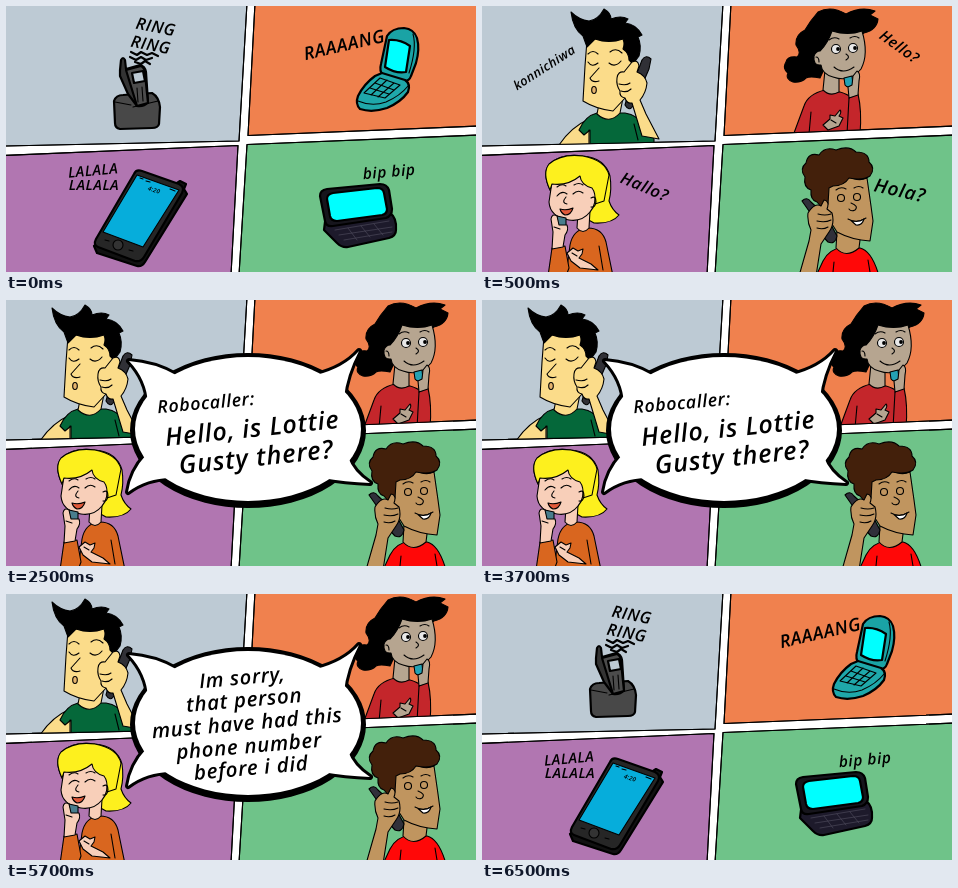
Write an HTML page that moves like this. It is 470 px wide and 266 px high and loops after 8 s.

```html
<!DOCTYPE html>
<html lang="en">
<head>
<meta charset="utf-8">
<title>Four phone calls</title>
<style>
  html, body { margin: 0; width: 100%; height: 100%; overflow: hidden; background: #fff; }
  svg { display: block; width: 100vw; height: 100vh; }
  path, ellipse, circle { stroke: #000; stroke-width: 1.1; stroke-linejoin: round; stroke-linecap: round; }
  .line path, .line circle { fill: none; }
  .dot circle { fill: #000; stroke: none; }
  .thick path { stroke-width: 2.2; }
  text { font: italic 600 20px "Open Sans", "Noto Sans", sans-serif; letter-spacing: .035em; text-anchor: middle; dominant-baseline: central; }
  #tails { stroke: inherit; stroke-width: inherit; }
  .rim > * { fill: #000; stroke: #000; stroke-width: 6; }
  .inside > * { fill: #fff; stroke: none; }
</style>
</head>
<body>
<svg viewBox="0 0 470 266" preserveAspectRatio="none">
  <defs>
    <path id="p1" d="M-3-3H241L233 135-3 140Z"/>
    <path id="p2" d="M249-3H473V120L242 129.500Z"/>
    <path id="p3" d="M-3 149.500 232 139.500 225 269H-3Z"/>
    <path id="p4" d="M241 138.500 473 129V269H233Z"/>
    <path id="tails" d="M123 61Q149 63 170 75L142 104Q141 80 123 61ZM353 51Q338 68 310 75L338 98Q340 76 353 51ZM122 192Q125 171 140 155L165 178Q141 178 122 192ZM364 183Q339 182 316 178L342 157Q347 172 364 183Z"/>
    <clipPath id="c1"><use href="#p1"/></clipPath>
    <clipPath id="c2"><use href="#p2"/></clipPath>
    <clipPath id="c3"><use href="#p3"/></clipPath>
    <clipPath id="c4"><use href="#p4"/></clipPath>
  </defs>
  <use href="#p1" fill="#bdcad4"/>
  <use href="#p2" fill="#f0814e"/>
  <use href="#p3" fill="#b176b1"/>
  <use href="#p4" fill="#6fc389"/>

  <g id="phones">
    <!-- cordless phone -->
    <g class="thick">
      <path fill="#484848" d="M108 95Q110 89 117 89L146 87Q153 91 154 101L153 118Q152 122 146 122L114 123Q109 122 109 117Z"/>
      <path fill="#333" d="M114 64 115 54Q117 50 119 54L120 63 134 59Q139 60 140 66L142 96Q138 101 131 100L122 88 114 70Z"/>
      <path fill="#4c4c4c" d="M120 64 135 60Q139 62 139 68L142 97 131 100Z"/>
      <path fill="#bdcad4" d="M126 67 137 65 139 75 128 77Z"/>
    </g>
    <g class="line">
      <path d="M131 82 132 96M136 81 137 95M109 96 125 99M127 101 152 95"/>
      <g class="thick"><path d="M125 46 131 49 135 46 141 49 146 47 152 50M124 51 130 54 135 51 140 54 146 52M129 56 135 58 139 55 144 58"/></g>
    </g>
    <!-- flip phone -->
    <g class="thick">
      <path fill="#1aa3a5" d="M381 30Q386 22 398 22 408 23 411 32 414 43 410 57L405 70Q403 76 396 75L377 69Q373 65 375 58Z"/>
      <path fill="#1fa8aa" d="M376 67 399 74Q405 78 402 86 395 96 381 102 366 107 354 103 349 98 352 90 358 78 369 70Z"/>
      <path fill="#0ff" d="M383 34Q394 33 404 40L400 66Q390 68 379 61Z"/>
    </g>
    <g class="line">
      <path d="M352 95Q366 101 380 96 394 90 402 80M374 72 394 79 379 92 358 87ZM369 77 388 84M364 82 383 88M381 74 365 89M388 77 372 91M407 28Q411 42 403 67"/>
    </g>
    <!-- touch phone -->
    <g class="thick">
      <path fill="#111" d="M171 177 174 175 180 178 178 183 181 188 139 256Q136 261 131 260L91 247 88 240Z"/>
      <path fill="#262626" d="M128 168Q130 163 136 165L173 178Q179 181 176 187L138 251Q135 256 129 255L92 241Q87 239 90 233Z"/>
    </g>
    <path fill="#06addb" d="M131 169 173 184 137 241 97 226Z"/>
    <circle cx="112" cy="239" r="5" fill="#333"/>
    <g class="line"><path d="M134 172 137 173M140 175 144 176M164 183 169 185M99 234 103 235M123 244 127 245"/></g>
    <text transform="translate(148 184) rotate(18)" style="font-size:6px">4:20</text>
    <!-- slider phone -->
    <g class="thick">
      <path fill="#1d1a2b" d="M319 216 384 207Q391 212 390 224 390 230 383 232L342 241Q336 242 331 237L318 224Z"/>
      <path fill="#16151c" d="M314 190Q314 184 321 183L374 178Q381 178 383 184L386 203Q386 210 380 212L327 220Q320 221 319 215Z"/>
      <path fill="#0ff" d="M321 193Q321 188 327 187L371 182Q377 182 378 187L381 203Q381 208 376 209L331 215Q325 215 324 210Z"/>
    </g>
    <path fill="none" d="M329 224 383 215M333 229 386 221M338 234 386 226M342 222 351 234M355 220 364 231M368 218 377 229" style="stroke:#4b485a;stroke-width:.7"/>

    <text transform="translate(150 20) rotate(11)" style="font-size:16.500px">RING</text>
    <text transform="translate(145 38) rotate(11)" style="font-size:16.500px">RING</text>
    <text transform="translate(338 38) rotate(-13)" style="font-size:18px">RAAAANG</text>
    <text transform="translate(87 164) rotate(-5)" style="font-size:14.500px">LALALA</text>
    <text transform="translate(88 178)" style="font-size:14.500px">LALALA</text>
    <text transform="translate(383 165) rotate(-5)" style="font-size:15.500px">bip bip</text>
  </g>

  <g id="people">
    <g clip-path="url(#c1)"><g class="who" data-move="-43 2">
      <path fill="#fbdc8a" d="M77 139Q89 121 107 113L110 140Z"/>
      <path fill="#05683a" d="M97 124Q103 110 115 107L143 107Q156 109 160 119L172 133V142H108V124L102 129Z"/>
      <path fill="#fbdc8a" d="M117 98 115 108Q127 119 138 107L141 92Z"/>
      <path fill="#fbdc8a" d="M105 34 103 60 101 95Q114 103 131 105L144 91 152 58 147 28Z"/>
      <path d="M105 41 101 30Q91 23 89 6 97 14 107 15 116 14 122 3 129 7 129 13 139 9 146 13L143 17Q154 18 160 29L156 31Q160 40 157 50L151 58 147 54Q147 47 141 43 143 38 141 33 127 38 113 33Z"/>
      <path fill="#303036" d="M160 54Q164 48 169 53L167 63 151 100Q147 106 143 99L146 88 157 62Z"/>
      <path fill="#fbdc8a" d="M135 72Q136 65 142 66L150 56Q156 53 157 60L155 66Q163 69 165 77 164 87 158 94L164 108 177 133 160 130 150 97Q145 98 143 92 137 91 138 85 134 79 135 72Z"/>
      <g class="line">
        <path d="M106 56Q110 62 116 57M127 57Q133 62 139 55M106 48Q111 43 116 48M128 46Q134 41 140 47M117 62 108 72Q110 77 117 75M137 78Q144 80 148 77M139 85Q145 87 149 83M107 124V140M152 118 156 134"/>
      </g>
      <ellipse cx="112" cy="84" rx="2.300" ry="3.500" fill="#e6b46d"/>
    </g></g>

    <g clip-path="url(#c2)"><g class="who" data-move="46 0">
      <path d="M338 72Q328 70 324 72 319 77 311 76 303 73 306 67 300 62 304 56 305 50 315 51 320 47 314 39 313 29 323 24 328 15 336 6 349-1 364 8 379 0 393 5L388 9 396 13Q395 24 382 27L350 46Z"/>
      <path fill="#c4262b" d="M312 127 322 100Q326 88 343 84L358 86Q373 90 375 101L372 133H312Z"/>
      <path fill="#b6a590" d="M343 64 341 84Q348 91 357 86L357 69Z"/>
      <path fill="#b6a590" d="M338 45Q346 37 350 25 366 30 380 25 387 48 379 63 368 77 351 71 340 68 339 59 331 60 332 50 334 45 338 45Z"/>
      <path fill="#c4262b" d="M367 92 376 88Q380 105 378 128H365Z"/>
      <path fill="#25a1b3" d="M362 72 370 70 371 79Q366 83 363 79Z"/>
      <path fill="#b6a590" d="M371 70 375 65Q379 67 377 75L376 89 367 92 366 81 370 79Z"/>
      <path fill="#b6a590" d="M341 119 348 113 348 109 353 110 358 104Q360 106 357 110L361 112 357 120 346 124Z"/>
      <g fill="#e8e8e8"><circle cx="354" cy="43" r="4.500"/><circle cx="371" cy="42" r="4.500"/></g>
      <g class="line">
        <path d="M347 34Q352 30 357 33M368 32Q373 29 377 32M364 48Q369 51 364 54M352 61Q361 69 372 61M349 114 354 117M329 106 327 128M334 51Q337 51 337 56"/>
      </g>
      <g class="dot"><circle cx="356" cy="43" r="1.900"/><circle cx="373" cy="42" r="1.900"/></g>
    </g></g>

    <g clip-path="url(#c3)"><g class="who" data-move="-12 0">
      <path fill="#fdf01e" d="M68 184Q59 165 69 157 80 147 101 150 123 152 128 170 130 183 127 195 130 204 137 209 130 218 112 217L94 207Z"/>
      <path fill="#d9661f" d="M84 270 88 239Q91 224 104 222 120 221 124 236L131 270Z"/>
      <path fill="#f8cfb9" d="M96 206 95 222Q101 229 107 222L108 205Z"/>
      <path fill="#f8cfb9" d="M70 176Q87 178 97 169 105 180 113 181 115 199 108 206 100 216 87 214 68 211 67 196Z"/>
      <path fill="#fdf01e" d="M68 184Q60 167 67 158 80 147 101 150 123 154 127 169L122 195 113 198Q114 187 110 182 99 179 98 170 86 180 70 178Z"/>
      <path fill="#d9661f" d="M70 242 83 240 87 262 84 270H66Z"/>
      <path fill="#497e8d" d="M75 210 84 212 84 220Q79 224 76 219Z"/>
      <path fill="#f8cfb9" d="M69 213Q70 207 75 210L77 219 85 219Q87 224 83 229L81 241 70 243 71 226Z"/>
      <path fill="#f8cfb9" d="M85 247 91 242 96 245 101 243 100 248 97 252 109 258 116 264 98 262 89 255Z"/>
      <path fill="#e05a3a" d="M78 203Q84 205 91 202 89 209 83 209 79 207 78 203Z"/>
      <g class="line">
        <path d="M75 190Q80 184 85 188M91 188Q96 183 101 187M75 181Q80 177 84 180M92 179Q97 176 101 179M84 191Q79 197 85 198M109 192Q114 189 114 196 113 202 109 201M72 221 78 223M90 247 95 250M117 240 121 264"/>
      </g>
    </g></g>

    <g clip-path="url(#c4)"><g class="who" data-move="43 0">
      <path fill="#ff0808" d="M334 270 341 255Q347 243 361 241L378 242Q390 245 397 270Z"/>
      <path fill="#c0955f" d="M355 225 354 242Q364 253 377 242L379 226Z"/>
      <path fill="#c0955f" d="M341 177Q358 183 366 170 376 176 385 172L389 200 391 215 388 235Q370 234 355 226L341 204Z"/>
      <path fill="#43200b" d="M341 203 335 196Q328 194 329 184 321 181 323 171 317 163 324 157 326 146 337 149 343 140 354 144 367 139 374 146 387 146 387 156 394 162 388 170 380 175 367 172 362 180 351 180L347 182 346 198Z"/>
      <path fill="#30303a" d="M320 195Q325 190 329 196L345 211 355 230Q353 239 346 236L331 220 327 205Z"/>
      <path fill="#c0955f" d="M326 207Q333 196 339 200L342 194Q348 195 345 203L350 207Q353 218 347 226L339 238 334 270H317L327 235 329 224Q325 216 326 207Z"/>
      <g class="line">
        <circle cx="359" cy="192" r="3.500"/><circle cx="375" cy="191" r="3.500"/>
        <path d="M354 184Q359 180 364 183M372 182Q377 179 381 182M369 197Q377 200 373 204 369 206 367 203M366 213Q375 218 384 212M336 208Q343 210 349 208M335 215Q343 217 349 214M335 222Q341 224 346 221M352 256 351 266M386 254 388 266"/>
      </g>
      <path fill="#fff" d="M369 214.500Q376 217 382 213 380 220 374 219Z"/>
    </g></g>
  </g>

  <g fill="none"><use href="#p1"/><use href="#p2"/><use href="#p3"/><use href="#p4"/></g>

  <g id="greet">
    <text transform="translate(62 61) rotate(-33)" style="font-size:12.800px">konnichiwa</text>
    <text transform="translate(418 40) rotate(36)" style="font-size:15px">Hello?</text>
    <text transform="translate(163 180) rotate(23)" style="font-size:16.500px">Hallo?</text>
    <text transform="translate(418 184) rotate(13)" style="font-size:19px">Hola?</text>
  </g>

  <g id="bubble">
    <g class="rim">
      <ellipse cx="242" cy="130.500" rx="115" ry="74.500"/>
      <use href="#tails"/>
    </g>
    <g class="inside">
      <ellipse cx="242" cy="129" rx="113" ry="72"/>
      <use href="#tails"/>
    </g>
    <g id="ask">
      <text transform="translate(200 102) rotate(-5)" style="font-size:17.800px">Robocaller:</text>
      <text transform="translate(246 127) rotate(-6)" style="font-size:25px">Hello, is Lottie</text>
      <text transform="translate(250 156) rotate(-6)" style="font-size:25.500px">Gusty there?</text>
    </g>
    <g id="reply" >
      <text transform="translate(236 83) rotate(-5)">Im sorry,</text>
      <text transform="translate(238 105) rotate(-5)" style="font-size:20.500px">that person</text>
      <text transform="translate(241 128) rotate(-5)" style="font-size:20.500px">must have had this</text>
      <text transform="translate(243 151) rotate(-5)" style="font-size:20.500px">phone number</text>
      <text transform="translate(245 173) rotate(-5)" style="font-size:20.500px">before i did</text>
    </g>
  </g>
</svg>
<script>
  const LOOP = 8000, cuts = [500, 2500, 4500, 6500];
  const scenes = [["phones"], ["people", "greet"], ["people", "bubble", "ask"], ["people", "bubble", "reply"], ["phones"]];
  const parts = ["phones", "people", "greet", "bubble", "ask", "reply"];
  const people = document.querySelectorAll(".who");
  const start = performance.now();

  function draw() {
    const t = (performance.now() - start) % LOOP;
    const shown = scenes[cuts.filter(c => t >= c).length];
    for (const id of parts)
      document.getElementById(id).style.display = shown.includes(id) ? "" : "none";
    const aside = shown.includes("bubble");
    for (const p of people)
      p.setAttribute("transform", `translate(${aside ? p.dataset.move : "0 0"})`);
    requestAnimationFrame(draw);
  }
  draw();
</script>
</body>
</html>
```
